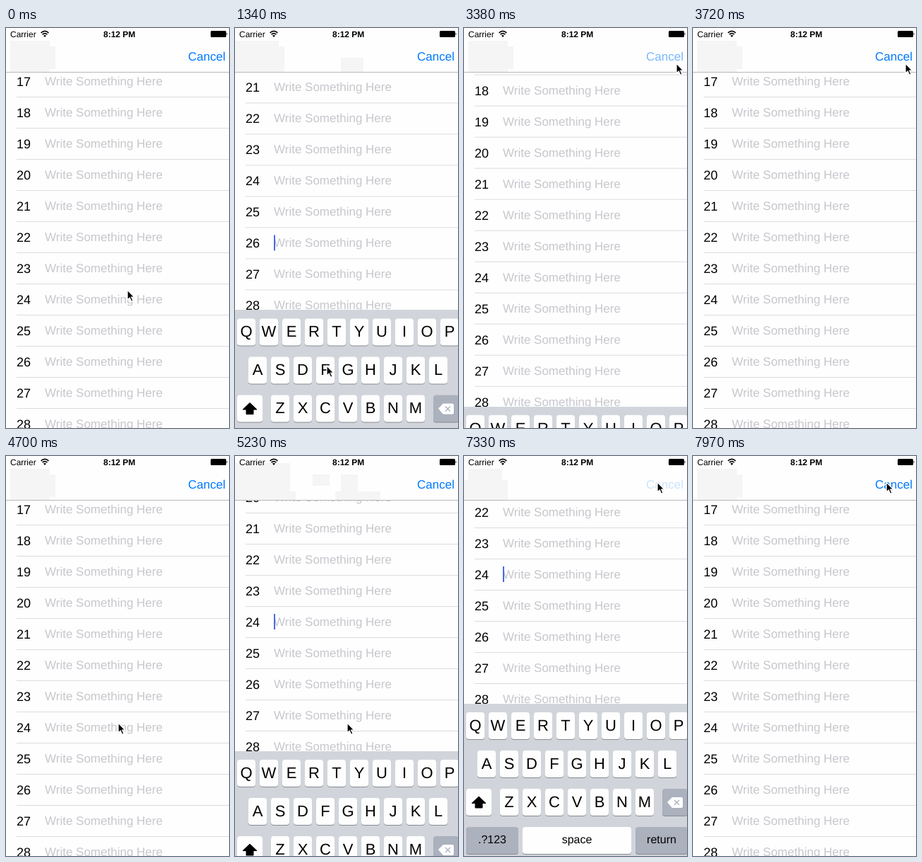
Animation of 316x565 px, one loop 8 s. Source, as an HTML page:

```html
<!DOCTYPE html>
<html lang="en">
<head>
<meta charset="utf-8">
<title>Keyboard and list</title>
<style>
  html, body { margin: 0; width: 100%; height: 100%; overflow: hidden; }
  body { position: relative; background: #fefefe; color: #000; cursor: default;
         font: 17px "Liberation Sans", Arial, sans-serif; white-space: nowrap;
         text-rendering: geometricPrecision; }
  body *, .caret { position: absolute; box-sizing: border-box; }
  svg * { position: static; }

  /* One loop is 8 s, so 1% is 80 ms. */
  #list, #keys, #pointer, .caret, #cancel, #haze { animation: 8s linear infinite; }
  #list, #keys { animation-name: rise; }
  #pointer { animation-name: point; }
  #cancel { animation-name: press; }
  #haze { animation-name: haze; animation-timing-function: step-end; }

  #list { left: 0; right: 0; top: 54px; }
  .row { left: 15px; right: 0; height: 44px; line-height: 44px; border-bottom: 1px solid #dcdce0; }
  .row b { left: 0; font-weight: 400; font-size: 18px; }
  .row i { left: 40px; font-style: normal; color: #c7c7cd; }
  .caret { left: 40px; top: 10px; width: 2px; height: 22px; background: #4a69e6; opacity: 0; }
  .n26 .caret { animation-name: blinkA; }
  .n24 .caret { animation-name: blinkB; }

  #nav { left: 0; right: 0; top: 0; height: 63px; background: #fefefe; border-bottom: 1px solid #b8b8ba; }
  #nav svg { left: 0; top: 0; }
  #haze { fill: #f5f5f5; }
  .status { top: 0; line-height: 18px; font-size: 12px; }
  #cancel { left: 258px; top: 31px; line-height: 20px; color: #007aff; }

  #keys { left: 0; top: 566px; width: 320px; height: 216px; background: #d1d5db; }
  .key { height: 38px; line-height: 38px; border-radius: 4px; background: #fefefe;
         box-shadow: 0 1px #888b90; text-align: center; font-size: 22px; }
  .word { font-size: 16px; line-height: 37px; }
  .dark { background: #abb1bd; }
  #keys svg { left: 0; top: 0; }
  #pointer { left: 0; top: 0; }

  @keyframes rise {
    0%, 15.155%, 64.09% { transform: none; animation-timing-function: cubic-bezier(.22, 1, .36, 1); }
    46.25%, 99.5%, 100% { transform: none; }
    21.405%, 70.34% { transform: translateY(-216px); }
    40.375%, 93.75% { transform: translateY(-216px); animation-timing-function: cubic-bezier(.22, 1, .36, 1); }
  }
  @keyframes blinkA {
    0%, 14.74%, 24%, 27.6%, 35.6%, 39.25%, 40.38%, 100% { opacity: 0; }
    14.75%, 21.25%, 28.5%, 32.9%, 40.1%, 40.37% { opacity: 1; }
  }
  @keyframes blinkB {
    0%, 63.99%, 73.4%, 77%, 85%, 88.6%, 93.76%, 100% { opacity: 0; }
    64%, 70.6%, 77.9%, 82.25%, 89.5%, 93.75% { opacity: 1; }
  }
  @keyframes press {
    0%, 39.36%, 45%, 91%, 99%, 100% { opacity: 1; }
    39.37%, 40.4%, 91.01%, 93.8% { opacity: .2; }
  }
  @keyframes point {
    0%, 5% { transform: translate(171px, 369px); animation-timing-function: ease-in-out; }
    11.5%, 18.5% { transform: translate(129px, 476px); animation-timing-function: ease-in; }
    23.5% { transform: translate(322px, 420px); animation-timing-function: step-end; }
    33.4% { transform: translate(322px, 130px); animation-timing-function: ease-out; }
    36.3%, 47.2% { transform: translate(300px, 49px); animation-timing-function: ease-in; }
    49.4% { transform: translate(239px, 182px); animation-timing-function: ease-out; }
    57.2% { transform: translate(155px, 388px); animation-timing-function: ease-in-out; }
    58.7%, 73.8% { transform: translate(158px, 376px); animation-timing-function: ease-in-out; }
    84.2%, 100% { transform: translate(273px, 36px); }
  }
  /* Faint blocks showing through the bar, changing with the list position. */
  @keyframes haze {
    0%, 41%, 94.5%, 100% { d: path("M6 18H62V26H70V58H62V62H6Z"); }
    15.2% { d: path("M0 18H62V26H70V62H0ZM150 42H182V62H150Z"); }
    21%, 70% { d: path("M6 18H54V34H62V62H0V34H6Z"); }
    64.1% { d: path("M0 10H78V50H86V62H0ZM110 26H134V42H110ZM150 26H174V50H206V62H142V50H150Z"); }
  }
</style>
</head>
<body>
<div id="list"></div>
<div id="nav">
  <svg width="316" height="62">
    <path id="haze"/>
    <g transform="translate(0 .5)">
      <path d="M49.6 6.4Q55 1.4 60.4 6.4M51.6 8.7Q55 5.5 58.4 8.7" fill="none" stroke="#000" stroke-width="1.7"/>
      <path d="M53 10.2Q55 8.6 57 10.2L55 12.4Z"/>
      <rect x="290" y="3.5" width="22" height="9" rx="1.5"/>
      <path d="M312.6 6.3Q314.6 8 312.6 9.8Z"/>
    </g>
  </svg>
  <span class="status" style="left:6px">Carrier</span>
  <span class="status" style="left:138px;font-weight:700">8:12 PM</span>
  <span id="cancel">Cancel</span>
</div>
<div id="keys"></div>
<svg id="pointer" width="13" height="19">
  <path d="M1 1V15L4.3 12L6.6 17.4L9 16.3L6.8 11.2H11Z" stroke="#fff" stroke-width="1.3"/>
</svg>
<script>
  const list = document.getElementById('list');
  const keys = document.getElementById('keys');

  for (let n = 17; n <= 28; n++) {
    list.insertAdjacentHTML('beforeend',
      `<div class="row n${n}" style="top:${(n - 17) * 44}px"><b>${n}</b><i>Write Something Here</i><u class="caret"></u></div>`);
  }

  function addKey(label, x, row, width = 26, kind = '') {
    keys.insertAdjacentHTML('beforeend',
      `<div class="key ${kind}" style="left:${x}px;top:${12 + row * 54}px;width:${width}px">${label}</div>`);
  }

  [['QWERTYUIOP', 3], ['ASDFGHJKL', 19], ['ZXCVBNM', 51]].forEach(([letters, left], row) =>
    [...letters].forEach((letter, i) => addKey(letter, left + i * 32, row)));

  addKey('<svg width="36" height="38"><path d="M18 11L28 20.5H23V27H13V20.5H8Z" stroke="#000" stroke-linejoin="round"/></svg>', 3, 2, 36);
  addKey('<svg width="36" height="38"><path d="M7 19L14 12H27Q29 12 29 14V25Q29 27 27 27H14Z" fill="#fff"/>' +
    '<path d="M17 16L24 23M24 16L17 23" stroke="#abb1bd" stroke-width="1.4"/></svg>', 281, 2, 36, 'dark');
  addKey('.?123', 3, 3, 74, 'word dark');
  addKey('space', 83, 3, 154, 'word');
  addKey('return', 243, 3, 74, 'word dark');
</script>
</body>
</html>
```
